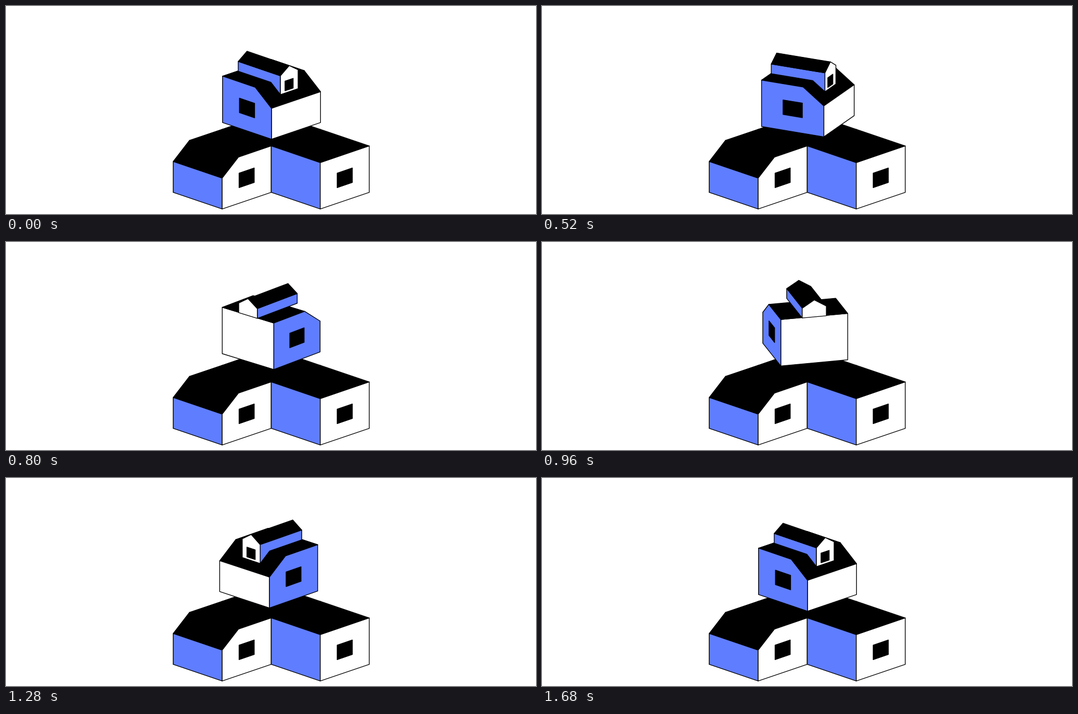
These frames come from a looping animation (1020 px wide and 400 px high, 2200 ms). An HTML page with a canvas:

```html
<!DOCTYPE html>
<html lang="en">
<head>
<meta charset="utf-8">
<title>Turning house</title>
<style>
html, body { margin: 0; width: 100%; height: 100%; overflow: hidden; background: #fff; }
canvas { display: block; }
</style>
</head>
<body>
<canvas id="stage" width="1020" height="400"></canvas>
<script>
const ctx = document.getElementById('stage').getContext('2d');
const BLUE = '#5f7dff', WHITE = '#fff', BLACK = '#000';
const LOOP = 2200, STEP = 40, STEPS = 34, START = 320;
const HALF = 94.3, TILT = .34, TOP = 89.2, LOW = 59.3, RIDGE = .667;

// Positive when the face looks towards the viewer
function area(points) {
  return points.reduce((sum, [x, y], i) => {
    const [nx, ny] = points[(i + 1) % points.length];
    return sum + x * ny - nx * y;
  }, 0);
}

function face(points, color) {
  if (!color || area(points) <= 0) return;
  ctx.beginPath();
  for (const [x, y] of points) ctx.lineTo(x, y);
  ctx.closePath();
  ctx.fillStyle = color;
  ctx.fill();
  ctx.stroke();
}

// Extrudes a profile along stops; point(p, stop) gives the screen position
function prism(profile, stops, point, caps, sides = []) {
  const back = [...stops].reverse();
  sides.forEach((color, i) => face([
    ...stops.map(s => point(profile[i], s)),
    ...back.map(s => point(profile[i + 1], s))
  ], color));
  face(profile.map(p => point(p, stops[0])), caps[0]);
  face(profile.map(p => point(p, back[0])).reverse(), caps[1]);
}

const rect = (a, b, low, high) => [[a, low], [a, high], [b, high], [b, low]];

// u runs from the tall wall to the low wall, v from gable to gable
function projector(cx, cy, angle) {
  const cos = Math.cos(angle), sin = Math.sin(angle);
  return (u, v, h) => {
    const x = HALF * (u + v - 1), z = HALF * (u - v);
    return [cx + x * cos + z * sin, cy + TILT * (z * cos - x * sin) - h];
  };
}

function house(at, low, gable, wall) {
  const point = ([u, h], v) => at(u, v, h);
  const outline = [[0, 0], [0, TOP], [RIDGE, TOP], [1, low], [1, 0]];
  prism(outline, [0, 1], point, [gable, gable], [wall, BLACK, BLACK, wall]);
  prism(rect(.345, .655, 30, 58), [0, 1], point, [BLACK, BLACK]);
}

function dormer(at) {
  const left = .32, right = .68, end = .862, eave = 107.2, peak = 121;
  const slope = [at(RIDGE, 0, TOP), at(RIDGE, 1, TOP), at(1, 1, LOW), at(1, 0, LOW)];
  const drop = area(slope) > 0 ? TOP - LOW : 0;
  const roof = u => TOP - .7 - drop * Math.max(0, (u - RIDGE) / (1 - RIDGE));
  // A missing height stands on the roof below
  const point = ([v, h], u) => at(u, v, h ?? roof(u));
  const outline = [[left], [left, eave], [.5, peak], [right, eave], [right]];
  prism(outline, [end, RIDGE, 0], point, [WHITE, WHITE], [BLUE, BLACK, BLACK, BLUE]);
  prism(rect(.413, .58, 75.3, 94), [end, 0], point, [BLACK]);
}

const smooth = s => s * s * (3 - 2 * s);

// cubic-bezier(.348, 0, .728, 1)
function ease(x) {
  let lo = 0, hi = 1;
  for (let i = 0; i < 24; i++) {
    const s = (lo + hi) / 2, r = 1 - s;
    if (3 * r * s * (r * .348 + s * .728) + s ** 3 < x) lo = s;
    else hi = s;
  }
  return smooth(lo);
}

function draw(t) {
  const n = Math.min(STEPS, Math.max(0, Math.floor((t - START) / STEP)));
  const turn = 2 * Math.PI * ease(n / STEPS);
  const lift = 11.5 * smooth(n < 17 ? n / 17 : Math.max(0, (32 - n) / 15));
  ctx.clearRect(0, 0, 1020, 400);
  ctx.lineWidth = 1.4;
  ctx.lineJoin = 'round';

  const quarter = -Math.PI / 2;
  house(projector(510.3, 326.4, quarter), TOP, WHITE, BLUE);
  house(projector(416, 358.4, quarter), LOW, WHITE, BLUE);
  house(projector(604.8, 358.4, quarter), TOP, WHITE, BLUE);

  // The turning house circles slightly off its own centre
  const cos = Math.cos(turn), sin = Math.sin(turn);
  const top = projector(508 + 3 * cos + 2.5 * sin,
    223.2 - lift + TILT * (2.5 * cos - 3 * sin), turn);
  house(top, LOW, BLUE, WHITE);
  dormer(top);
}

const begin = performance.now();
function tick() {
  draw((performance.now() - begin) % LOOP);
  requestAnimationFrame(tick);
}
tick();
</script>
</body>
</html>
```
